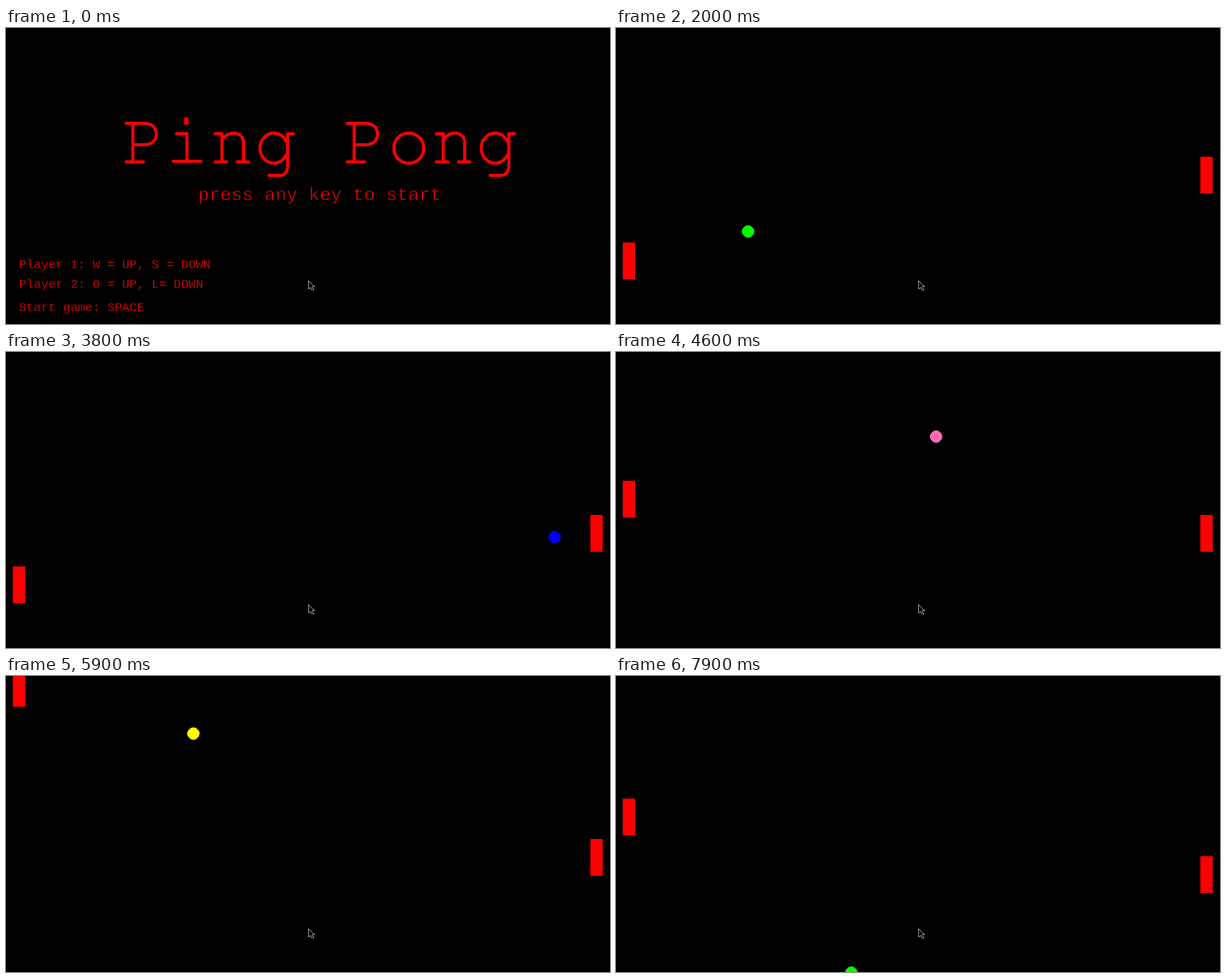
An HTML page that plays this animation: 983x483 px, repeating every 8000 ms.

```html
<!DOCTYPE html>
<html lang="en">
<head>
<meta charset="utf-8">
<title>Ping Pong</title>
<style>
  html, body { margin: 0; width: 100%; height: 100%; overflow: hidden; background: #000; }
  svg { display: block; width: 983px; height: 483px; }
  text { font-family: "Liberation Mono", "Courier New", monospace; font-size: 20px; fill: #f00;
         stroke: #000; stroke-width: .4px; white-space: pre; }
  #prompt { font-size: 30px; text-anchor: middle; stroke-width: .8px; }
  #title { font-size: 120px; text-anchor: middle; fill: none; stroke: none; }
  .pen { fill: none; stroke: #f00; stroke-width: 5; stroke-linecap: round; stroke-linejoin: round; }
  .pen, #game, #cursor { shape-rendering: crispEdges; }
</style>
</head>
<body>
<svg viewBox="0 0 983 483">
  <defs>
    <path id="P" d="M195.5 155.5H225C238 155.5 244.5 163 244.5 173S238 190.5 225 190.5H206.5M206.5 155.5V218.5M195.5 218.5H223.5"/>
    <path id="n" d="M340.5 172.5H351.5V218.5M340.5 218.5H359M351.5 183C356 176 363 171.5 370 171.5C381 171.5 386.5 178 386.5 188V218.5M376.5 218.5H394.5"/>
    <path id="g" d="M467.5 172.5H458.5V224C458.5 234 454 240.5 445 240.5H428M458.5 196A22.5 24.5 0 1 1 413.5 196A22.5 24.5 0 1 1 458.5 196"/>
  </defs>

  <g id="menu">
    <text id="title" x="511" y="221">Ping Pong</text>
    <g class="pen">
      <use href="#P"/><use href="#n"/><use href="#g"/>
      <path d="M277.5 172.5H294.5V217.5M272.5 217.5H317"/>
      <rect x="290" y="146" width="7" height="12" fill="#f00" stroke="none"/>
      <g transform="translate(360)"><use href="#P"/><use href="#n"/><use href="#g"/></g>
      <circle cx="655.5" cy="196" r="24.5"/>
    </g>
    <text id="prompt" x="510.5" y="281">press any key to start</text>
    <text x="21" y="392">Player 1: W = UP, S = DOWN</text>
    <text x="21" y="424">Player 2: O = UP, L= DOWN</text>
    <text x="21" y="462">Start game: SPACE</text>
  </g>

  <g id="game" visibility="hidden">
    <rect id="left" x="11" width="20" height="60" fill="#f00"/>
    <rect id="right" x="951" width="20" height="60" fill="#f00"/>
    <circle id="ball" r="10"/>
  </g>

  <path id="cursor" transform="translate(492.5 411.5)" stroke="#fff" stroke-width=".75"
        d="M0 0V14L3 11L6 16H8V14L6 11V10H10Z"/>
</svg>
<script>
// Times are in slots of 100 ms; the screen skips its update in the held slots.
const SLOT = 100, LOOP = 80, GAME_AT = 8;
const HELD = [25, 26, 27, 32, 37, 41, 45, 47, 51, 53, 57, 60, 63, 67, 72, 75];
const COLORS = ['#00ff00', '#0000ff', '#ff69b4', '#ffff00'];

// Key points [slot, value]: the game clock in ticks, and the paddle tops
const CLOCK = [
  [15, 0], [24, 84], [31, 159], [38, 221], [46, 303], [52, 357],
  [56, 406], [59, 431], [66, 506], [70, 542], [79, 634]
];
const LEFT = [
  [15, 210], [20, 350], [42, 350], [46, 210], [50, 42], [53, 42],
  [56, -10], [68, -10], [70, 46], [75, 46], [79, 200]
];
const RIGHT = [[35, 210], [38, 266], [68, 266], [70, 294]];

// The ball's centre moves by STEP per tick between these walls
const STEP = { x: 6, y: 2 };
const X = { min: 29, max: 953, start: 491 };
const Y = { min: -12, max: 492, start: 240 };

const $ = id => document.getElementById(id);
const set = (id, attrs) => {
  for (const k in attrs) $(id).setAttribute(k, attrs[k]);
};

const updates = slot => slot - HELD.filter(h => h <= slot).length;

// Value at a slot, advancing evenly with each screen update
function along(keys, slot) {
  const i = keys.findIndex(([s]) => s >= slot);
  if (i < 0) return keys[keys.length - 1][1];
  if (i === 0) return keys[0][1];
  const [s0, v0] = keys[i - 1], [s1, v1] = keys[i];
  const n0 = updates(s0);
  return Math.floor(v0 + (v1 - v0) * (updates(slot) - n0) / (updates(s1) - n0));
}

// Bounce between the walls after travelling d from the start
function bounce({ min, max, start }, d) {
  const len = max - min, round = 2 * len;
  const p = ((start - min + d) % round + round) % round;
  return min + len - Math.abs(len - p);
}

function draw(slot) {
  const playing = slot >= GAME_AT;
  set('menu', { visibility: playing ? 'hidden' : 'visible' });
  set('game', { visibility: playing ? 'visible' : 'hidden' });

  const ticks = along(CLOCK, slot);
  const travel = STEP.x * ticks;
  // A new colour at every paddle hit
  const hits = Math.floor((travel + X.max - X.start) / (X.max - X.min));
  set('left', { y: along(LEFT, slot) });
  set('right', { y: along(RIGHT, slot) });
  set('ball', {
    cx: bounce(X, -travel),
    cy: bounce(Y, STEP.y * ticks),
    fill: COLORS[hits % COLORS.length]
  });
}

const began = performance.now();
function tick() {
  draw(Math.floor((performance.now() - began) / SLOT) % LOOP);
  requestAnimationFrame(tick);
}
tick();
</script>
</body>
</html>
```
